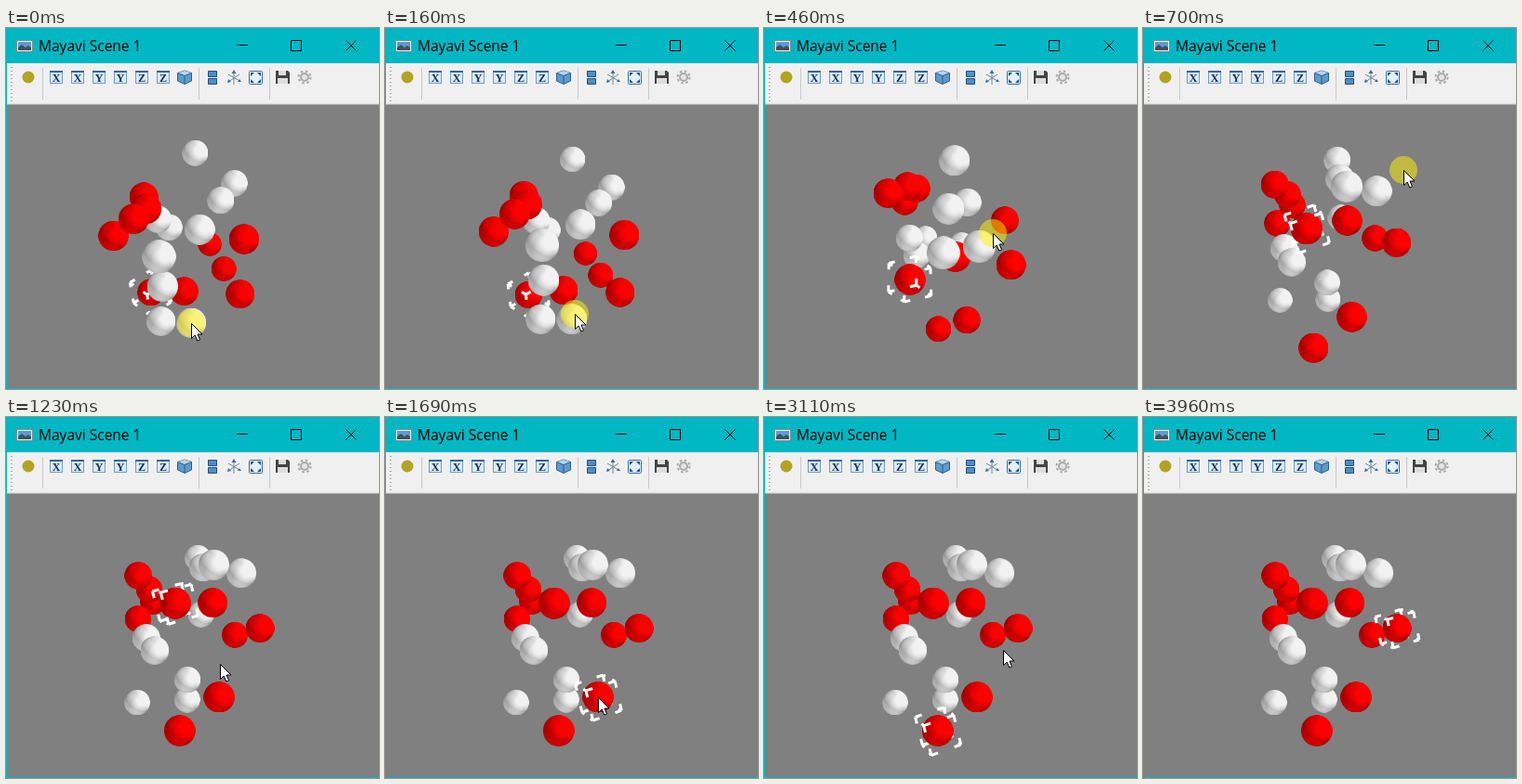
Recreate the animation shown at these times as an HTML page with a canvas. Size 401 by 389 pixels, loop 4260 ms.

```html
<!DOCTYPE html>
<html lang="en">
<head>
<meta charset="utf-8">
<title>Mayavi Scene 1</title>
<style>
  html, body { margin: 0; width: 100%; height: 100%; overflow: hidden; background: #808080; }
  svg, canvas { position: absolute; left: 0; top: 0; }
  .title { font: 15.5px "Open Sans", "Noto Sans", sans-serif; }
  .axis { font: bold 12px "Liberation Serif", serif; text-anchor: middle; fill: #10305c; }
</style>
</head>
<body>
<svg width="401" height="389" viewBox="0 0 401 389">
  <rect width="401" height="389" fill="#00b7c3"/>
  <rect x="1" y="38" width="400" height="45" fill="#f0f0f0"/>
  <rect x="1" y="82" width="400" height="306" fill="#808080"/>
  <rect x="1" y="81.5" width="400" height="1" fill="#d8d8d8"/>

  <rect x="11.5" y="13.5" width="17" height="12" fill="#eee" stroke="#888"/>
  <rect x="13" y="15" width="14" height="9" fill="#5b9bd0"/>
  <path d="M13 24v-3l4-3 4 3 3-2 3 2v3z" fill="#41505c"/>
  <text class="title" x="35" y="25">Mayavi Scene 1</text>
  <path d="M248 18.5h12M306.5 13.5h11v11h-11zM365.5 13.5l11 11m0-11l-11 11" fill="none" stroke="#000"/>

  <path d="M6 42v38" stroke="#aaa" stroke-width="2" stroke-dasharray="1 3"/>
  <path d="M39.5 43v34M207.5 43v34M283.5 43v34" stroke="#c8c8c8"/>
  <circle cx="24" cy="53" r="6.5" fill="#b3a322"/>
  <g id="axes"></g>

  <path d="M184.500 48.500l7.500-2.500 7.500 2.500v8.500l-7.500 3.500-7.500-3.500z" fill="#5d9bcb" stroke="#2a5f91"/>
  <path d="M184.500 48.500l7.500-2.500 7.500 2.500-7.500 3z" fill="#b5d6ee"/>
  <path d="M192 51.500v9M184.500 48.500l7.500 3 7.500-3" fill="none" stroke="#2a5f91"/>
  <path d="M217.500 46.500h9v6h-9zM217.500 54.500h9v6h-9z" fill="#4f8fc4" stroke="#1f4f80"/>
  <path d="M245 46v15M239 50l12 7M239 58l12-8" stroke="#6d8798"/>
  <path d="M245 45l2.500 4h-5zM253 58l-4 0 2-3zM238 59l1-4 3 3z" fill="#356f9f"/>
  <rect x="261.5" y="46.5" width="14" height="14" rx="1" fill="#e4f0fa" stroke="#2f6ea6"/>
  <path d="M263 52v-4h4zM270 48h4v4zM274 55v4h-4zM267 59h-4v-4z" fill="#174f86"/>
  <path d="M290 46h13l2 2v12h-15z" fill="#444"/>
  <path d="M293 46h8v5h-8zM292 54h11v6h-11z" fill="#ddd"/>
  <circle cx="321" cy="53" r="6.5" fill="none" stroke="#aaa" stroke-width="2" stroke-dasharray="2.550"/>
  <circle cx="321" cy="53" r="4" fill="#e4e4e4" stroke="#aaa" stroke-width="2"/>
</svg>
<canvas id="scene" width="401" height="389"></canvas>

<script>
const LOOP = 4260, STEP = 77, CENTER = [200.5, 235], CAMERA = 571, RADIUS = 15.1;
const RAD = Math.PI / 180, { sin, cos } = Math;
const TILT = 20 * RAD, SPIN = 55 * RAD;
const ctx = document.getElementById('scene').getContext('2d');

document.getElementById('axes').innerHTML = [...'XXYYZZ'].map((letter, i) => {
  const x = 54 + 23 * i;
  return `<rect x="${x - 6.5}" y="46.5" width="13" height="13" fill="#dcebf7" stroke="#6d9cc4"/>` +
    `<path d="M${x - 7} 47h14" stroke="#2c69a3" stroke-width="2"/>` +
    `<text class="axis" x="${x}" y="58">${letter}</text>`;
}).join('');

// Ball centres: along the drag direction, along the spin axis, towards the viewer.
const reds = [
  [41, -78, -10], [32, -64, -32], [21, -56, -41], [23, -26, 64], [-4, -65, -36],
  [38, 8, 31], [17, 46, -44], [31, 64, 14], [-48, 45, 54], [-91, 20, 59]];
const whites = [
  [86, -25, -43], [72, -14, 3], [72, -4, 50], [76, 25, 33], [26, 1, -43],
  [-20, -46, -3], [-29, -32, 9], [-97, -34, -54], [-50, 12, -35], [-73, 20, -48]];

const ring = a => [cos(a), sin(a) * cos(TILT), -sin(a) * sin(TILT)];
const cubeAxes = [ring(SPIN), ring(SPIN + Math.PI / 2), [0, sin(TILT), cos(TILT)]];

// Pointer moves: from, until, x, y. The first one drags the scene.
const moves = [
  [45, 855, 289, 135], [900, 1240, 230, 266], [1240, 1540, 229, 302], [1960, 2480, 195, 347],
  [2480, 2620, 184, 339], [2860, 3180, 278, 226], [3760, 3930, 384, 420]];
// Button down, button up, red ball picked by it.
const clicks = [[0, 920, 3], [1540, 1690, 8], [2620, 2770, 9], [3460, 3540, 7]];

// Lamps: elevation, azimuth, intensity.
const lamps = [[45, 45, 1], [-30, -60, 0.6], [-30, 60, 0.5]].map(([elevation, azimuth, power]) => {
  const e = elevation * RAD, a = azimuth * RAD;
  return [cos(e) * sin(a), sin(e), cos(e) * cos(a)].map(n => n * power);
});

function shadedBall(red, green, blue) {
  const size = 48, half = size / 2;
  const sprite = document.createElement('canvas');
  sprite.width = sprite.height = size;
  const g = sprite.getContext('2d'), image = g.createImageData(size, size);
  for (let i = 0; i < size * size; i++) {
    const x = (i % size + 0.5 - half) / half, y = (half - Math.floor(i / size) - 0.5) / half;
    const z = Math.sqrt(Math.max(0, 1 - x * x - y * y));
    const light = lamps.reduce((sum, [lx, ly, lz]) => sum + Math.max(0, lx * x + ly * y + lz * z), 0);
    const shade = Math.min(1, 0.35 + 0.65 * light);
    const edge = Math.min(1, Math.max(0, (1 - Math.hypot(x, y)) * half + 0.5));
    image.data.set([red * shade, green * shade, blue * shade, 255 * edge], i * 4);
  }
  g.putImageData(image, 0, 0);
  return sprite;
}
const redBall = shadedBall(255, 0, 0), whiteBall = shadedBall(242, 242, 242);

function pointerAt(t) {
  let x = 199, y = 318;
  for (const [from, until, toX, toY] of moves) {
    const k = Math.min(1, Math.max(0, (t - from) / (until - from)));
    const eased = k * k * (3 - 2 * k);
    x += (toX - x) * eased;
    y += (toY - y) * eased;
  }
  return [x, y];
}

function project([u, v, w], angle) {
  const c = cos(angle), s = sin(angle);
  const along = u * c + w * s, depth = w * c - u * s, scale = CAMERA / (CAMERA - depth);
  return {
    x: CENTER[0] + scale * (sin(TILT) * along + cos(TILT) * v),
    y: CENTER[1] + scale * (sin(TILT) * v - cos(TILT) * along),
    depth, scale
  };
}

function ballItem(ball, sprite, angle) {
  const { x, y, depth, scale } = project(ball, angle), r = RADIUS * scale;
  return { depth, draw: () => ctx.drawImage(sprite, x - r, y - r, 2 * r, 2 * r) };
}

function cornerItem(ball, signs, angle) {
  const at = lengths => project(ball.map((value, n) =>
    value + RADIUS * cubeAxes.reduce((sum, axis, k) => sum + axis[n] * signs[k] * lengths[k], 0)), angle);
  const tip = at([1, 1, 1]);
  const arms = [0, 1, 2].map(k => at([0, 1, 2].map(n => n === k ? 0.55 : 1)));
  return { depth: tip.depth, draw() {
    ctx.beginPath();
    for (const arm of arms) { ctx.moveTo(arm.x, arm.y); ctx.lineTo(tip.x, tip.y); }
    ctx.stroke();
  } };
}

const arrow = new Path2D('M0 0V16L3.7 12.5L6.3 18.5L9 17.3L6.5 11.5H11.5Z');
function drawPointer(x, y, pressed) {
  if (pressed) {
    ctx.fillStyle = 'rgba(255, 244, 0, 0.5)';
    ctx.beginPath();
    ctx.arc(x, y, 15, 0, 2 * Math.PI);
    ctx.fill();
  }
  ctx.save();
  ctx.translate(x + 0.5, y + 0.5);
  ctx.fillStyle = '#fff';
  ctx.strokeStyle = '#000';
  ctx.lineWidth = 1;
  ctx.fill(arrow);
  ctx.stroke(arrow);
  ctx.restore();
}

function render(time) {
  // The screen was sampled about 13 times a second.
  const t = Math.max(0, 80 + STEP * Math.floor((time - 72) / STEP));
  const [x, y] = pointerAt(t);
  const [, dragEnd] = clicks[0];
  const angle = t < dragEnd ? (135 - y) * 0.7 * RAD : 0;
  const picked = reds[clicks.findLast(([, up], i) => i === 0 || up <= t)[2]];
  const items = [
    ...reds.map(ball => ballItem(ball, redBall, angle)),
    ...whites.map(ball => ballItem(ball, whiteBall, angle))];
  for (let i = 0; i < 8; i++)
    items.push(cornerItem(picked, [1, 2, 4].map(bit => i & bit ? 1 : -1), angle));

  ctx.clearRect(0, 0, 401, 389);
  ctx.strokeStyle = '#fff';
  ctx.lineWidth = 3;
  items.sort((a, b) => a.depth - b.depth).forEach(item => item.draw());
  drawPointer(Math.round(x), Math.round(y), clicks.some(([down, up]) => t >= down && t < up));
}

const start = performance.now();
function tick() {
  render((performance.now() - start) % LOOP);
  requestAnimationFrame(tick);
}
tick();
</script>
</body>
</html>
```
